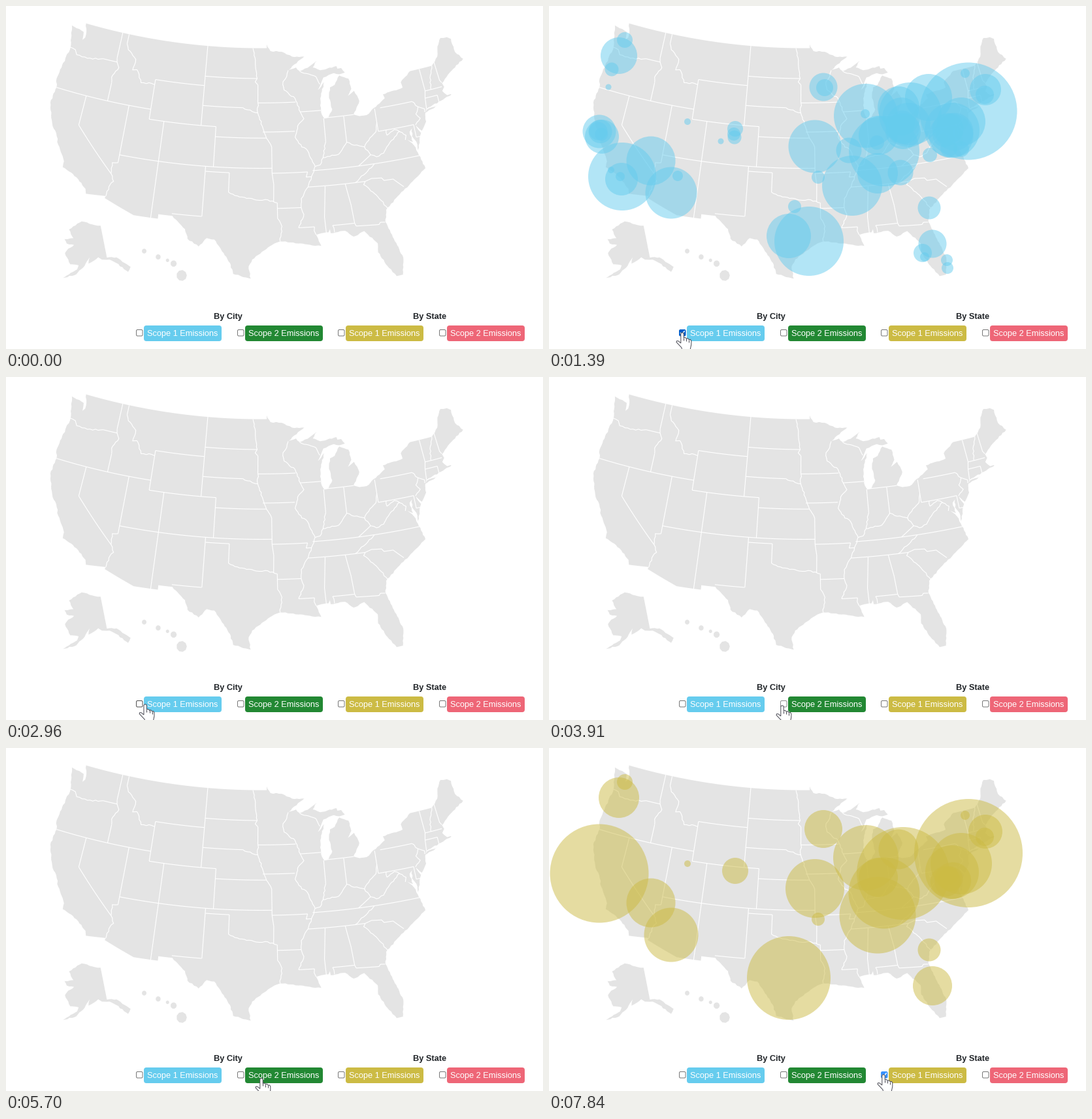
Recreate the animation shown at these times as a matplotlib script. Size 822 by 525 pixels, loop 8000 ms.

```python
import numpy as np
import matplotlib.pyplot as plt
from matplotlib.animation import FuncAnimation
from matplotlib.collections import LineCollection, PatchCollection
from matplotlib.patches import Circle, FancyBboxPatch, Polygon

W, H, PX = 822, 525, 0.72  # PX: points per pixel
STEP, LOOP = 20, 8000
LAND = "#e4e4e4"
BLUE, GREEN, GOLD, PINK = "#66ccee", "#228833", "#ccbb44", "#ee6677"
rng = np.random.default_rng(4)

fig = plt.figure(figsize=(W / 100, H / 100), dpi=100, facecolor="white")
ax = fig.add_axes([0, 0, 1, 1])
ax.set(xlim=(0, W), ylim=(H, 0))
ax.axis("off")


def albers(lon0, lat1, lat2, scale, ref, at):
    """Equal-area conic projection that puts ref (lon, lat) at a stage point."""
    s1, s2 = np.sin(np.radians([lat1, lat2]))
    n = (s1 + s2) / 2
    c = 1 - s1 ** 2 + 2 * n * s1

    def raw(lonlat):
        lon, lat = np.radians(np.asarray(lonlat, float)).T
        rho = scale * np.sqrt(c - 2 * n * np.sin(lat)) / n
        turn = n * (lon - np.radians(lon0))
        return np.column_stack([rho * np.sin(turn), rho * np.cos(turn)])

    shift = np.array(at) - raw([ref])[0]
    return lambda lonlat: raw(lonlat) + shift


SCALE = 875
mainland = albers(-96, 29.5, 45.5, SCALE, (-96.6, 38.7), (383.4, 222.2))
alaska = albers(-154, 55, 65, 0.35 * SCALE, (-156, 58.5), (114.8, 398.1))
hawaii = albers(-157, 8, 18, SCALE, (-160, 19.9), (204, 407.7))


def dense(pts, n=12):
    """Follow the curved graticule between key points."""
    pts = np.array(pts, float)
    s = np.linspace(0, len(pts) - 1, n * (len(pts) - 1) + 1)
    return np.column_stack([np.interp(s, range(len(pts)), pts[:, k]) for k in (0, 1)])


def rough(pts, amp=0.8):
    """Break long segments up with small seeded sideways offsets."""
    out = [pts[0]]
    for a, b in zip(pts[:-1], pts[1:]):
        d = b - a
        size = np.hypot(*d)
        n = int(size // 3.5)
        for k in range(1, n):
            side = np.array([-d[1], d[0]]) / size
            out.append(a + d * k / n + side * rng.uniform(-amp, amp))
        out.append(b)
    return np.array(out)


def land(*parts):
    ax.add_patch(Polygon(np.vstack(parts), fc=LAND, lw=0, zorder=1))


def coast(*pts, proj=mainland):
    return rough(proj(pts))


# Mainland outline in degrees, clockwise from the north-west
great_lakes = coast(
    (-95.15, 49), (-95.15, 49.38), (-94.6, 48.7), (-92.9, 48.6), (-91.4, 48.07), (-89.6, 48),
    (-92, 46.75), (-90.9, 46.95), (-90.4, 46.57), (-89.2, 46.85), (-87.8, 47.47),
    (-88.45, 46.85), (-87.4, 46.5), (-85, 46.75), (-84.9, 46.48), (-84.35, 46.5), (-83.9, 46),
    (-84.7, 45.9), (-85.5, 46.08), (-87.05, 45.75), (-88, 44.55), (-87, 45.28), (-87.75, 43.7),
    (-87.8, 42.3), (-87.4, 41.65), (-86.9, 41.72), (-86.25, 42.5), (-86.53, 43.65),
    (-86.25, 44.7), (-85.55, 44.9), (-84.75, 45.78), (-83.5, 45.35), (-83.3, 44.3),
    (-83.9, 43.65), (-82.95, 44.07), (-82.42, 43), (-83.45, 41.73), (-82.7, 41.5),
    (-81.7, 41.5), (-78.9, 42.85), (-79.05, 43.27), (-76.2, 43.55), (-76.3, 44.1), (-74.7, 45))
atlantic = coast(
    (-71.5, 45), (-70.4, 45.75), (-70, 46.7), (-69.23, 47.46), (-68.3, 47.36), (-67.79, 47.07),
    (-67.79, 45.7), (-66.97, 44.8), (-69, 44), (-70.75, 43.05), (-70.6, 42.65), (-71, 42.3),
    (-70.5, 41.77), (-70, 41.78), (-70.2, 42.07), (-69.95, 41.7), (-71.5, 41.4), (-73.65, 40.98),
    (-74, 40.45), (-74.1, 39.75), (-74.9, 38.95), (-75.55, 39.6), (-75.08, 38.75), (-75.95, 37.15),
    (-75.9, 38), (-76.3, 38.6), (-76.1, 39.4), (-76.5, 39.1), (-76.35, 38.05), (-77, 38.4),
    (-76.3, 37.7), (-76, 36.9), (-75.5, 35.25), (-76.55, 34.65), (-77.9, 33.9), (-79.2, 33.2),
    (-81.1, 31.9), (-81.4, 30.7), (-80.55, 28.45), (-80.05, 26.9), (-80.4, 25.2))
gulf = coast(
    (-81.1, 25.15), (-81.8, 26.1), (-82.75, 27.8), (-82.65, 28.7), (-84, 30.1), (-85.3, 29.68),
    (-86.2, 30.35), (-87.9, 30.25), (-87.95, 30.65), (-88.15, 30.35), (-89.6, 30.2), (-89.4, 29.8),
    (-89.1, 29.05), (-90.1, 29.15), (-92.3, 29.55), (-93.8, 29.7), (-94.75, 29.35), (-97, 27.9),
    (-97.4, 27.2), (-97.15, 25.96), (-99.1, 26.4), (-99.5, 27.5), (-101.4, 29.77), (-102.3, 29.87),
    (-103.15, 28.98), (-104.5, 29.65), (-104.9, 30.6), (-106.53, 31.78))
mexico = mainland(dense([(-106.53, 31.78), (-108.2, 31.78), (-108.2, 31.33), (-111.07, 31.33),
                         (-114.81, 32.5), (-114.72, 32.72), (-117.12, 32.53)]))
pacific = coast(
    (-117.3, 33), (-118.4, 33.75), (-119.2, 34.15), (-120.6, 34.55), (-120.65, 35.15),
    (-121.9, 36.6), (-122.5, 37.6), (-123, 38), (-123.7, 38.95), (-124.4, 40.4), (-124.2, 42),
    (-124.55, 42.85), (-123.95, 46.2), (-124.7, 48.38), (-122.75, 48.1), (-122.6, 47.3),
    (-122.3, 47.6), (-122.5, 48.5), (-122.76, 49))
north = mainland(dense([(-122.76, 49), (-95.15, 49)], 60))
st_lawrence = mainland(dense([(-74.7, 45), (-71.5, 45)]))
land(north, great_lakes, st_lawrence, atlantic, gulf, mexico, pacific)
land(coast((-74, 40.6), (-72, 41.05), (-73.6, 40.9)))

land(coast(
    (-141, 69.65), (-148, 70.4), (-156.5, 71.35), (-166.2, 68.6), (-162, 66.3), (-168, 65.6),
    (-166, 64.5), (-161, 64.4), (-164.5, 63.1), (-166, 61.7), (-162, 58.8), (-157.3, 58.7),
    (-158, 57.5), (-164.8, 54.6), (-158.3, 56.1), (-154, 58.6), (-151, 61), (-151.8, 59.2),
    (-148.5, 60), (-146, 60.8), (-144, 60), (-139.7, 59.6), (-136.5, 58.2), (-132, 54.8),
    (-130, 55.9), (-135.5, 59.7), (-141, 60.3), proj=alaska))
for lon, lat, size in [(-159.5, 22.05, 0.25), (-158, 21.47, 0.27), (-157, 21.13, 0.18),
                       (-156.35, 20.8, 0.33), (-155.5, 19.6, 0.55)]:
    a = np.arange(0, 2 * np.pi, 0.7)
    ring = np.column_stack([lon + size * np.cos(a), lat + size * np.sin(a)])
    land(rough(hawaii(ring)))

# State lines along parallels (lat, from, to) and meridians (lon, from, to)
PARALLELS = [
    (46, -118.98, -116.92), (42, -124.2, -111.05), (41, -111.05, -102.05), (37, -114.05, -94.62),
    (45, -111.05, -104.05), (45.94, -104.05, -96.56), (43, -104.05, -98.5), (40, -102.05, -95.3),
    (43.5, -96.45, -91.2), (40.6, -95.77, -91.5), (42.5, -90.65, -87.8), (36.5, -103, -100),
    (36.5, -94.62, -90.15), (36.6, -89.5, -75.9), (35, -90.2, -83.1), (33, -94.04, -91.17),
    (31, -91.6, -89.73), (31, -87.6, -85), (32, -106.62, -103.06), (42, -79.76, -75.35),
    (39.72, -80.52, -75.79), (42.03, -73.5, -71.8), (42.73, -73.27, -70.9), (41.73, -87.2, -83.45)]
MERIDIANS = [
    (-120, 39, 42), (-114.05, 36.2, 42), (-111.05, 41, 45), (-109.05, 31.33, 41),
    (-104.05, 41, 49), (-102.05, 37, 41), (-103.04, 32, 37), (-100, 34.56, 36.5),
    (-94.62, 36.5, 39.1), (-94.04, 32, 33.55), (-117.04, 46.4, 49), (-117.03, 42, 43.85),
    (-116.05, 48, 49), (-87.53, 39.35, 41.7), (-84.81, 39.1, 41.7), (-80.52, 39.72, 42),
    (-75.79, 38.45, 39.72), (-71.8, 41.35, 42.03)]
borders = [mainland(dense([(a, lat), (b, lat)], 40)) for lat, a, b in PARALLELS]
borders += [mainland(dense([(lon, a), (lon, b)])) for lon, a, b in MERIDIANS]


def border(*pts):
    borders.append(mainland(dense(pts)))


def river(*pts):
    borders.append(rough(mainland(pts), 1))


border((-120, 39), (-114.63, 35))
border((-94.62, 36.5), (-94.43, 35.4), (-94.48, 33.64))
border((-88.1, 34.95), (-88.47, 31.9), (-88.4, 30.3))
border((-85.6, 35), (-85.18, 32.87), (-85, 31))
border((-73.35, 45), (-73.27, 42.75), (-73.5, 42.05), (-73.65, 41))
border((-71.08, 45.3), (-70.98, 43.4), (-70.75, 43.1))
border((-81.97, 37.54), (-83.68, 36.6))
border((-75.79, 38.45), (-75.05, 38.45))
border((-90.15, 36.5), (-90.35, 36), (-89.7, 36))

# Columbia, Snake, Bitterroot, Colorado
river((-124, 46.25), (-123.2, 46.15), (-122.8, 45.7), (-121.2, 45.65), (-119.3, 45.93), (-118.98, 46))
river((-117.04, 46.4), (-116.92, 46), (-116.5, 45.5), (-117.2, 44.4), (-117.03, 43.85))
river((-116.05, 48), (-115.7, 47.45), (-114.35, 46.65), (-114.5, 45.55), (-113.9, 45.65),
      (-113, 44.45), (-111.5, 44.55), (-111.05, 44.48))
river((-114.05, 36.2), (-114.75, 36.1), (-114.63, 35), (-114.15, 34.3), (-114.5, 33.9), (-114.72, 32.72))
# Red River of the North, Missouri, Red River, Sabine
river((-97.23, 49), (-96.85, 47.5), (-96.56, 45.94), (-96.85, 45.6), (-96.45, 45.3))
border((-96.45, 45.3), (-96.45, 43.5))
river((-98.5, 43), (-97.9, 42.8), (-96.45, 42.5), (-95.85, 41.2), (-95.3, 40), (-94.62, 39.1))
river((-96.45, 43.5), (-96.45, 42.5))
river((-100, 34.56), (-99.2, 34.25), (-96.6, 33.85), (-95.5, 33.9), (-94.04, 33.55))
river((-94.04, 32), (-93.55, 31.2), (-93.8, 29.7))
# Mississippi and Pearl
river((-92.05, 46.7), (-92.3, 46.1), (-92.85, 45.6), (-92.75, 44.75), (-91.25, 43.85), (-90.65, 42.5),
      (-90.2, 41.8), (-91.1, 41.1), (-91.5, 40), (-90.7, 39), (-90.15, 38.8), (-89.15, 37),
      (-89.7, 36), (-90.2, 35), (-91.1, 33.9), (-91.17, 33), (-90.9, 32.3), (-91.6, 31))
river((-89.73, 31), (-89.8, 30.6), (-89.6, 30.2))
# Ohio, Wabash and the Appalachians
river((-89.15, 37), (-88.5, 37.1), (-88.05, 37.8), (-86, 38), (-84.81, 39.1), (-84.2, 38.8),
      (-82.6, 38.4), (-81.75, 39.2), (-80.85, 39.7), (-80.52, 40.64))
river((-88.05, 37.8), (-87.53, 39.35))
river((-82.6, 38.4), (-81.97, 37.54), (-81.25, 37.25), (-80.3, 37.5), (-79.3, 38.42), (-77.75, 39.35))
river((-79.48, 39.72), (-79.48, 39.2), (-78.4, 39.62), (-77.75, 39.3), (-77.05, 38.85), (-77.25, 38.4))
river((-84.32, 35), (-83.5, 35.57), (-82.6, 36), (-81.68, 36.59))
# South-east and north-east
river((-83.1, 35), (-83.35, 34.7), (-82, 33.5), (-80.9, 32.05))
border((-83.1, 35), (-82.3, 35.2), (-81.05, 35.1), (-80.8, 34.82), (-79.67, 34.8), (-78.55, 33.87))
border((-85, 31), (-84.86, 30.7), (-82.2, 30.55), (-82, 30.75), (-81.45, 30.7))
river((-87.6, 31), (-87.45, 30.3))
river((-90.4, 46.57), (-88.1, 45.9), (-87.65, 45.1))
river((-75.35, 42), (-74.7, 41.36), (-75.2, 40.7), (-74.75, 40.2), (-75.55, 39.65))
border((-74.7, 41.36), (-73.9, 41), (-74, 40.7))
river((-71.5, 45), (-72.05, 44.1), (-72.46, 42.73))
ax.add_collection(LineCollection(borders, colors="white", linewidths=1.15 * PX, zorder=2))

# Main bubbles: x, y and the radius in each layer (0: absent)
HUBS = [
    (107, 76, 28, 17.5, 31), (116, 52, 12, 3, 12), (77, 192, 25.5, 9, 75.5), (112, 261, 52, 34, 0),
    (156, 237, 37.5, 37.5, 37.5), (187, 286, 39.5, 27, 41.5), (285, 188, 12, 12.5, 20),
    (420, 124, 21.5, 14.5, 29), (407, 215, 40.5, 0, 45), (367, 352, 34, 28.5, 64),
    (398, 360, 53, 44.5, 0), (464, 275, 46, 30, 0), (459, 221, 19.5, 23.5, 0), (485, 168, 49, 46, 50),
    (503, 256, 31, 29, 58.5), (513, 222, 54, 37, 54.5), (504, 198, 30, 45, 30), (542, 192, 27, 26, 71),
    (535, 155, 32, 25.5, 30.5), (553, 165, 48, 30.5, 0), (581, 140, 36, 19.5, 0), (642, 161, 74.5, 42.5, 83),
    (631, 177, 37, 28.5, 47), (617, 190, 42, 24, 41), (668, 128, 24, 18, 26), (582, 309, 17.5, 16, 17.5),
    (587, 364, 21.5, 23, 30), (538, 255, 19.5, 13.5, 0)]
EVERYWHERE = [(212, 177, 5), (412, 262, 10), (667, 136, 14)]
TOWNS = [
    (96, 97, 10.5), (91, 124, 4.5), (95, 251, 5), (109, 261, 7), (197, 260, 8), (263, 207, 4.5),
    (283, 196, 10), (284, 201, 10.5), (422, 125, 13), (376, 307, 10), (484, 165, 7), (502, 209, 11),
    (631, 219, 12), (612, 218, 13), (583, 228, 11), (572, 378, 14), (575, 384, 7), (609, 389, 9),
    (610, 401, 9)]


def cluster(x, y, spread, n, small, big):
    at = rng.normal((x, y), spread, (n, 2))
    return [(*p, r) for p, r in zip(at, np.linspace(small, big, n))]


EXTRAS = [
    TOWNS + [(81, 200, 26), (111, 265, 25), (637, 103, 7)] + cluster(79, 194, 2, 3, 10, 18)
    + cluster(538, 180, 9, 5, 14, 34) + cluster(614, 194, 5, 5, 14, 34),
    TOWNS + [(81, 200, 10.5), (111, 265, 10)] + cluster(533, 180, 12, 4, 9, 20)
    + cluster(614, 195, 3, 2, 14, 18),
    [(637, 103, 7)] + cluster(613, 198, 6, 4, 14, 28)]


def bubbles(k, color):
    spots = [(h[0], h[1], h[2 + k]) for h in HUBS if h[2 + k]] + EVERYWHERE + EXTRAS[k]
    discs = PatchCollection([Circle((x, y), r) for x, y, r in spots],
                            fc=color, alpha=0.5, lw=0, zorder=3)
    discs.set_visible(False)
    return ax.add_collection(discs)


layers = [bubbles(k, color) for k, color in enumerate([BLUE, GREEN, GOLD])]


def label(x, y, text, **kw):
    ax.text(x, y, text, ha="center", va="baseline", family="Liberation Sans",
            size=12.8 * PX, zorder=5, **kw)


def rounded(x, y, w, h, r, **kw):
    style = f"round,pad=0,rounding_size={r}"
    return ax.add_patch(FancyBboxPatch((x, y), w, h, boxstyle=style, **kw))


# Legend with check boxes
label(340, 479, "By City", color="#212529", weight="bold")
label(649, 479, "By State", color="#212529", weight="bold")
boxes, ticks = [], []
for i, color in enumerate([BLUE, GREEN, GOLD, PINK]):
    x = round(211 + 154.7 * i)
    rounded(x, 489, 119, 24, 4, fc=color, lw=0, zorder=4)
    label(x + 59.5, 505.3, f"Scope {1 + i % 2} Emissions", color="white")
    boxes.append(rounded(x - 11.5, 495.5, 9.5, 9.5, 1.8, lw=PX, zorder=4))
    ticks += ax.plot([x - 9.6, x - 7.6, x - 3.8], [500.6, 502.6, 497.8],
                     color="white", lw=1.5 * PX, zorder=5)

# Pointing hand, relative to the fingertip
HAND = np.array([
    (-2.2, 1.5), (-1, 0), (1, 0), (2.2, 1.5), (2.2, 8), (4, 7.3), (6, 8.5), (6.4, 9.4), (8.4, 8.6),
    (10.4, 10.8), (12.4, 10.4), (13.8, 12.5), (13.8, 18), (11.5, 29), (0, 29), (-1, 23),
    (-9, 14.5), (-8.4, 12.6), (-6, 12.8), (-2.2, 16)])
CREASES = [np.array([(x, y), (x, y + 4)]) for x, y in [(2.2, 8), (6.4, 9.4), (10.4, 10.8)]]
INK = "#4a4a54"
hand = ax.add_patch(Polygon(HAND, fc="white", ec=INK, lw=PX, zorder=8))
creases = ax.add_collection(LineCollection(CREASES, colors=INK, linewidths=PX, zorder=9))

# press to tick, ticked, press to clear, cleared (ms)
CLICKS = [(1290, 1390, 2670, 2890), (3910, 4030, 5220, 5420), (6650, 6750, 7840, LOOP)]
HOVER = [(890, 2980), (3750, 5600), (6460, LOOP)]
MOVE_T = [640, 990, 1180, 2930, 3280, 3630, 3750, 5540, 5950, 6350, 6460]
MOVE_X = [201, 205, 204, 204, 284, 355, 357, 357, 439, 509, 512]
MOVE_Y = [528, 503, 500, 500, 509, 506, 503, 503, 509, 504, 500]


def update(i):
    t = i * STEP + STEP / 2
    at = np.array([np.interp(t, MOVE_T, MOVE_X), np.interp(t, MOVE_T, MOVE_Y)])
    hand.set_xy(HAND + at)
    creases.set_segments([c + at for c in CREASES])
    for k, box in enumerate(boxes):
        on = press = hover = False
        if k < len(CLICKS):
            p1, start, p2, end = CLICKS[k]
            on = start <= t < end
            press = p1 <= t < start or p2 <= t < end
            hover = HOVER[k][0] <= t < HOVER[k][1]
            layers[k].set_visible(on)
        shade = 2 if press else int(hover)
        fill = ("#0075ff", "#005cc8", "#3792ff")[shade]
        edge = ("#767676", "#4f4f4f", "#8d8d8d")[shade]
        box.set_facecolor(fill if on else "white")
        box.set_edgecolor(fill if on else edge)
        ticks[k].set_visible(on)
    return [hand, creases, *layers, *boxes, *ticks]


anim = FuncAnimation(fig, update, frames=LOOP // STEP, interval=STEP,
                     init_func=lambda: update(0), repeat=True, repeat_delay=0)
plt.show()
```
